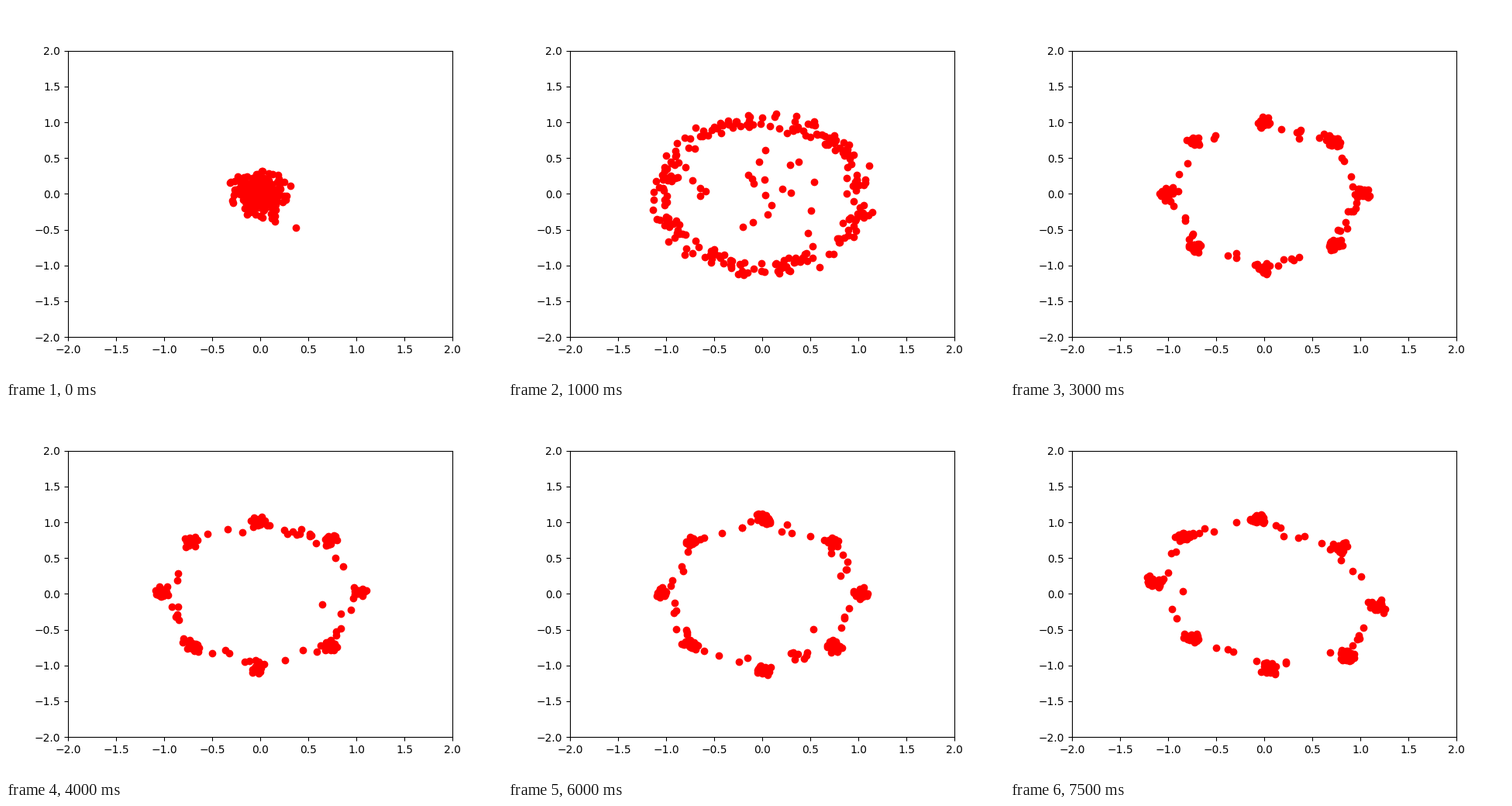
A matplotlib script that plays this animation: 640 by 480 pixels, repeating every 8000 ms.

```python
import numpy as np
import matplotlib.pyplot as plt
from matplotlib.animation import FuncAnimation

STEPS, STEP_MS = 16, 500
POINTS, MODES = 250, 8
RADIUS = 1.03
LEAN = np.array([[0.12, -0.05], [-0.14, 0.0]])


def polar(r, a):
    return np.column_stack([r * np.cos(a), r * np.sin(a)])


def scatter(rng, n, sigma):
    """Normal noise without far outliers."""
    return sigma * np.clip(rng.normal(size=(n, 2)), -2.2, 2.2)


def ring(rng, step):
    """A ring that gathers into eight modes joined by thin bridges."""
    loose = 0.2 + 0.8 * 0.25 ** (step - 2)
    sigma = 0.03 + 0.03 * loose
    n_loose = round(POINTS * loose)
    n_inner = round(24 * loose ** 2)
    n_tight = POINTS - n_loose

    # Each mode wanders a little from step to step
    mode = np.arange(MODES)
    centers = polar(RADIUS, 2 * np.pi * mode / MODES)
    centers += scatter(rng, MODES, 0.02 * (1 - loose))
    tight = centers[np.arange(n_tight) % MODES] + scatter(rng, n_tight, sigma)

    # Bridges sag inwards between neighbouring modes
    gap = rng.uniform(0, MODES, n_loose - n_inner)
    sag = 0.13 * (1 - loose) * np.sin(np.pi * (gap % 1))
    bridge = polar(RADIUS - sag, 2 * np.pi * gap / MODES)
    bridge += scatter(rng, len(bridge), sigma)

    inner = polar(0.9 * np.sqrt(rng.uniform(0, 1, n_inner)),
                  rng.uniform(0, 2 * np.pi, n_inner))

    points = np.vstack([tight, bridge, inner])
    lean = (step / (STEPS - 1)) ** 24   # skews the ring at the very end
    return points + lean * points @ LEAN.T


def cloud(step):
    rng = np.random.default_rng(40 + step)
    if step == 0:
        return rng.normal(0, 0.125, (POINTS, 2))
    if step == 1:
        spray = rng.normal((-0.13, 0.04), (0.7, 0.58), (POINTS, 2))
        return np.clip(spray, (-1.91, -1.34), (1.59, 1.49))
    return ring(rng, step)


clouds = [cloud(step) for step in range(STEPS)]

fig, ax = plt.subplots(figsize=(6.4, 4.8), dpi=100)
ax.set_xlim(-2, 2)
ax.set_ylim(-2, 2)
dots, = ax.plot([], [], "ro")


def update(step):
    dots.set_data(clouds[step].T)
    return dots,


anim = FuncAnimation(fig, update, frames=STEPS, interval=STEP_MS,
                     repeat=True, repeat_delay=0)
plt.show()
```
